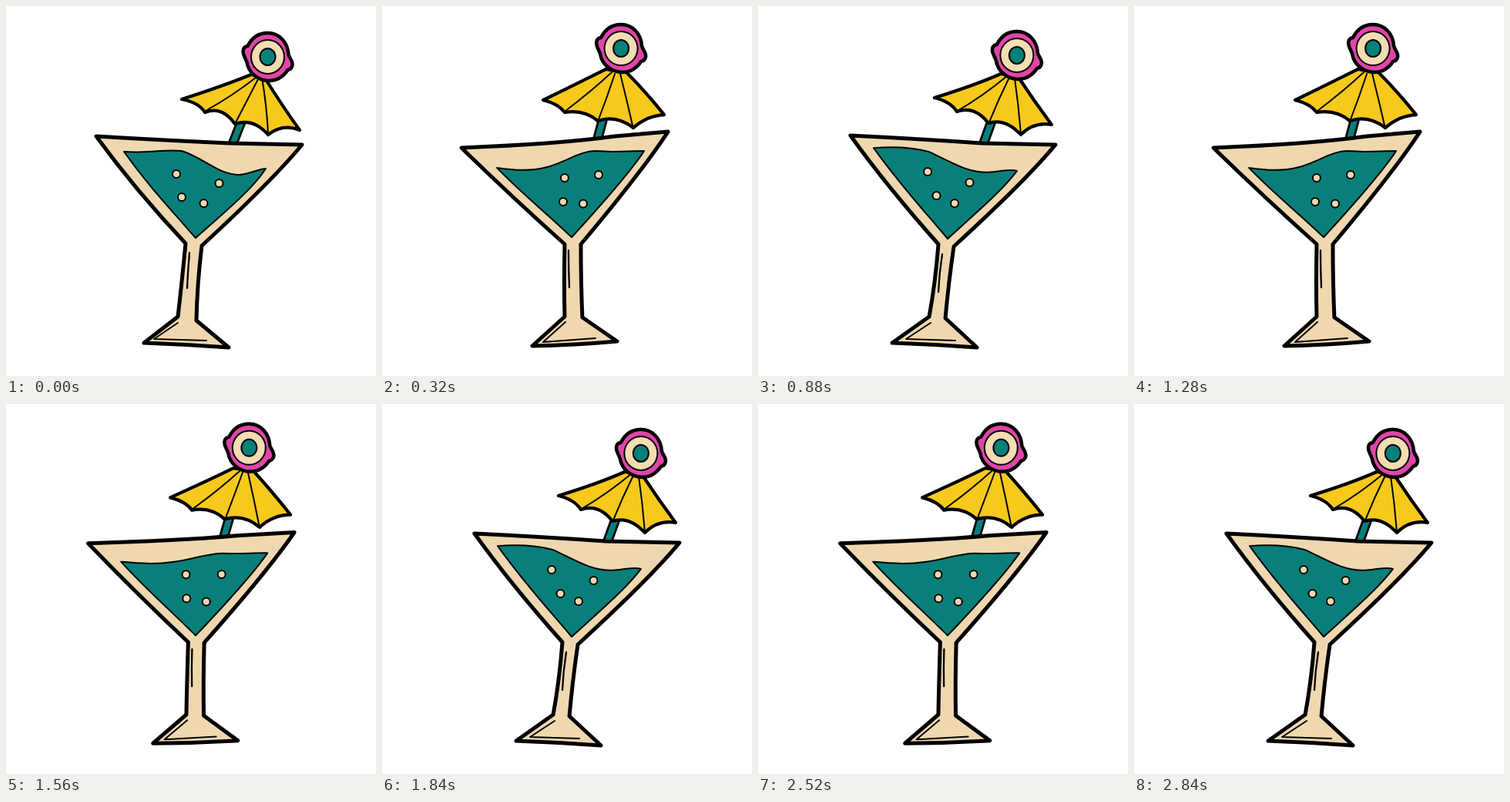
Recreate the animation shown at these times as an HTML page with a canvas. Size 480 px wide and 480 px high, loop 2.88 s.

```html
<!DOCTYPE html>
<html lang="en">
<head>
<meta charset="utf-8">
<title>Swaying cocktail</title>
<style>
  html, body { margin: 0; height: 100%; overflow: hidden; background: #fff; }
  canvas { display: block; width: 480px; height: 480px; }
</style>
</head>
<body>
<canvas id="stage" width="480" height="480"></canvas>
<script>
const ctx = document.getElementById('stage').getContext('2d');
ctx.lineCap = ctx.lineJoin = 'round';

const BLACK = '#000', CREAM = '#efd8b0', TEAL = '#087f79', YELLOW = '#f6c91c',
      PINK = '#e045a8', EYE_WHITE = '#f5dcb3';

const EYE_CENTRES = [[339.5, 66], [310, 55], [336, 64]];
const eyeShape = shape => EYE_CENTRES.map(([x, y]) => `M${x} ${y} ${shape}`);
const ellipse = (rx, ry) =>
  eyeShape(`m${-rx} 0 a${rx} ${ry} 0 1 0 ${2 * rx} 0 a${rx} ${ry} 0 1 0 ${-2 * rx} 0 z`);

// Every part has three poses: leaning right at the start, leaning left, leaning right at the end.
const STICK = [
  'M308 143 L294 179',
  'M288 141 L279 175',
  'M304 147 L292 180'
];
const BUBBLES = [
  'M221 218 h0 M276.500 230 h0 M228 248 h0 M256.500 256 h0',
  'M237 223 h0 M281 219 h0 M235 254 h0 M261 256.500 h0',
  'M220 215 h0 M274.500 229 h0 M231.500 246 h0 M255 256 h0'
];

const PARTS = [
  { stroke: BLACK, width: 13, poses: STICK },
  { stroke: TEAL, width: 7.5, poses: STICK },
  { fill: YELLOW, stroke: BLACK, width: 4.2, poses: [
    'M318 89 Q281 104 228 121 Q250 125 258 138 Q280 129 297 153 Q321 145 340 167 Q359 152 381 161 Q358 129 335 92 Z',
    'M290 82 Q252 101 209 122 Q229 127 237 138 Q262 134 280 149 Q304 141 326 158 Q344 142 366 141 Q341 110 317 86 Z',
    'M315 88 Q281 103 229 119 Q250 124 258 137 Q281 129 299 152 Q321 145 341 167 Q358 150 381 154 Q358 123 337 91 Z'
  ] },
  { stroke: BLACK, width: 2, poses: [
    'M324 93 Q293 117 259 136 M328 93 Q312 124 298 151 M332 93 Q338 127 340 165',
    'M298 86 Q271 111 238 136 M302 88 Q292 118 281 147 M309 88 Q317 120 325 155',
    'M323 91 Q293 116 259 136 M326 93 Q312 121 300 151 M333 93 Q338 128 341 165'
  ] },
  { fill: PINK, stroke: BLACK, width: 4.5, poses: eyeShape(
    'm0 -31 c15 0 26 12 27 28 c2 6 6 9 5 14 q-1 5 -6 6 c-6 9 -15 14 -25 14 ' +
    'c-15 -1 -26 -11 -28 -24 c-2 -6 -5 -9 -5 -14 q0 -6 6 -7 c5 -10 14 -17 26 -17 z') },
  { fill: EYE_WHITE, stroke: BLACK, width: 2, poses: ellipse(21.5, 22) },
  { fill: TEAL, stroke: BLACK, width: 2, poses: ellipse(10, 11) },
  { fill: CREAM, stroke: BLACK, width: 5, poses: [
    'M117 169 Q200 174 290 178 L384 180 Q345 227 254 311 Q248 360 247 408 L289 443 Q235 439 179 437 L223 403 Q228 360 233 308 Q168 239 117 169 Z',
    'M103 184 Q230 179 302 169 L371 163 Q337 215 258 309 Q258 360 260 404 L305 435 Q250 440 195 441 L237 403 Q236 360 237 309 Q171 250 103 184 Z',
    'M120 168 Q200 172 290 178 L386 180 Q347 227 254 312 Q247 360 243 405 L284 443 Q230 439 174 437 L222 403 Q230 360 234 309 Q168 235 120 168 Z'
  ] },
  { fill: TEAL, stroke: BLACK, width: 2, poses: [
    'M153 189 C180 191 205 186 228 188 C255 196 275 219 303 219 C320 217 328 211 337 211 C320 237 290 262 246 301 C215 265 185 234 153 189 Z',
    'M149 210 C172 213 190 215 214 209 C238 203 255 188 278 188 C300 190 320 188 340 188 C323 214 290 252 246 300 C215 270 185 247 149 210 Z',
    'M150 184 C175 182 200 183 222 189 C250 202 270 216 298 216 C315 215 326 211 336 214 C318 238 290 262 246 302 C215 265 185 233 150 184 Z'
  ] },
  { stroke: BLACK, width: 12, poses: BUBBLES },
  { stroke: CREAM, width: 8, poses: BUBBLES },
  { stroke: BLACK, width: 2.3, poses: [
    'M238 320 Q236 343 235 366',
    'M242 317 Q242 341 243 365',
    'M239 322 Q235 347 234 371'
  ] },
  { stroke: BLACK, width: 2, poses: [
    'M223 411 L192 432 L260 434',
    'M238 410 L209 436 L277 431',
    'M224 411 L192 432 L256 434'
  ] }
];

const NUMBER = /-?\d+(\.\d+)?/g;

// Whole numbers stay whole, so that arc flags remain valid.
function blend(from, to, amount) {
  const targets = to.match(NUMBER);
  let i = 0;
  return from.replace(NUMBER, n => +(+n + (targets[i++] - n) * amount).toFixed(3));
}

const STEP = 40, STEPS = 24, TURN = 10.5, REACH = 1.15;

function draw(time) {
  const step = Math.floor(time / STEP) % STEPS;
  const leaving = step < TURN;
  const angle = Math.PI * (leaving ? step / TURN : 1 + (step - TURN) / (STEPS - 1.5 - TURN));
  const lean = REACH * (1 - Math.cos(angle)) / 2;

  ctx.fillStyle = '#fff';
  ctx.fillRect(0, 0, 480, 480);
  for (const { fill, stroke, width, poses } of PARTS) {
    const path = new Path2D(blend(poses[leaving ? 0 : 2], poses[1], lean));
    if (fill) {
      ctx.fillStyle = fill;
      ctx.fill(path);
    }
    ctx.strokeStyle = stroke;
    ctx.lineWidth = width;
    ctx.stroke(path);
  }
}

const start = performance.now();
function tick() {
  draw(performance.now() - start);
  requestAnimationFrame(tick);
}
tick();
</script>
</body>
</html>
```
